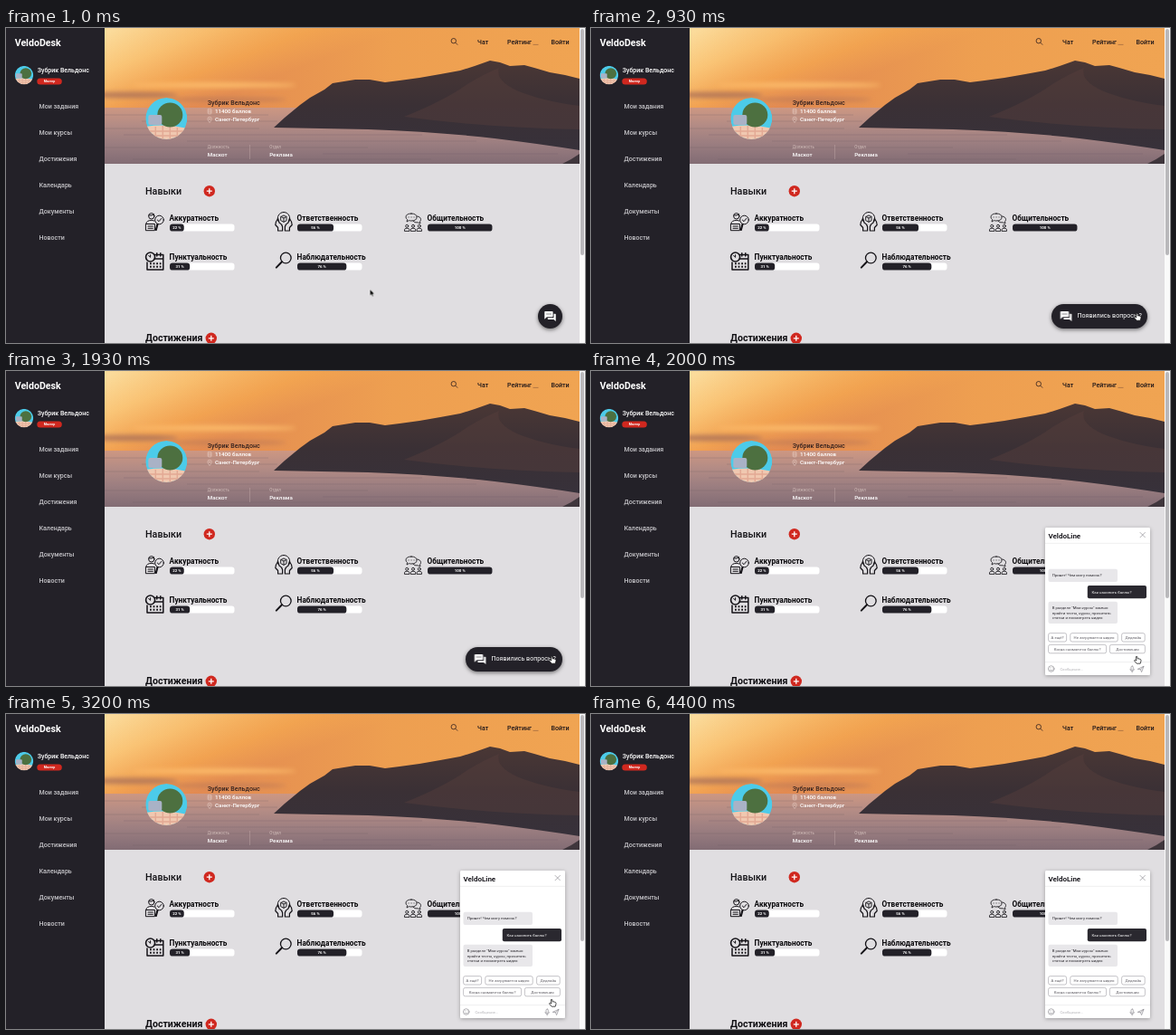
An HTML page that plays this animation: 640 px wide and 348 px high, repeating every 4.47 s.

```html
<!DOCTYPE html>
<html lang="ru">
<head>
<meta charset="utf-8">
<title>VeldoDesk</title>
<style>
  :root { --dark: #232128; --loop: 4.47s; }
  html, body { margin: 0; width: 100%; height: 100%; overflow: hidden; background: #e0dee1; }
  #stage { position: relative; width: 640px; height: 348px; overflow: hidden; font-family: Roboto, sans-serif; }
  svg { position: absolute; left: 0; top: 0; display: block; }
  text { font-family: Roboto, sans-serif; }
  .menu text { font-size: 7.05px; font-weight: 500; fill: #c6c5c9; }
  .nav text { font-size: 7.1px; font-weight: 500; fill: #21181a; }
  .info text { font-size: 6.2px; font-weight: 500; fill: #fff; }
  .info .cap { font-size: 4.5px; font-weight: 400; fill: #e6d3cd; opacity: .75; }
  .skill { font-size: 8.25px; font-weight: 700; fill: #08070a; }
  .pct { font-size: 4.4px; font-weight: 700; fill: #fff; text-anchor: middle; }
  .line { fill: none; stroke: #141217; stroke-width: 1; stroke-linecap: round; stroke-linejoin: round; }
  .msg { font-size: 4.35px; fill: #29272d; }
  .chips rect { fill: #fff; stroke: #8b8990; stroke-width: .5; }
  .chips text { font-size: 4.3px; fill: #5c5a61; text-anchor: middle; }
  .thin { fill: none; stroke: #807e85; stroke-width: .6; stroke-linecap: round; stroke-linejoin: round; }

  #help {
    position: absolute; right: 25.3px; top: 305px; width: 26.7px; height: 26.7px;
    border-radius: 13.4px; background: var(--dark); color: #fff; overflow: hidden;
    box-shadow: 0 1.5px 4px rgba(0,0,0,.5);
    animation: widen var(--loop) infinite;
  }
  #help svg { left: 6.8px; top: 6.8px; animation: shift var(--loop) infinite; }
  #help span {
    position: absolute; left: 28px; top: 0; font: 400 7.1px/26px Roboto, sans-serif;
    white-space: nowrap; animation: show var(--loop) infinite;
  }
  @keyframes widen {
    0%, 15.2% { width: 26.7px; animation-timing-function: ease; }
    22%, 100% { width: 106.7px; }
  }
  @keyframes shift {
    0%, 15.2% { transform: none; animation-timing-function: ease; }
    22%, 100% { transform: translateX(2.6px); }
  }
  @keyframes show {
    0%, 15.2% { opacity: 0; animation-timing-function: ease; }
    19%, 100% { opacity: 1; }
  }

  #chat { animation: open var(--loop) step-end infinite; }
  @keyframes open { 0% { visibility: hidden; } 44.6%, 100% { visibility: visible; } }

  #cursor { animation: move var(--loop) infinite; }
  #arrow { animation: arrow var(--loop) step-end infinite; }
  #hand { animation: hand var(--loop) step-end infinite; }
  @keyframes move {
    0%, 3.2% { transform: translate(402.3px, 288.6px); animation-timing-function: ease-in-out; }
    18.6%, 76% { transform: translate(603px, 315px); animation-timing-function: ease-in; }
    86%, 100% { transform: translate(646px, 317px); }
  }
  @keyframes arrow { 0% { opacity: 1; } 15.2% { opacity: 0; } 80% { opacity: 1; } 100% { opacity: 1; } }
  @keyframes hand { 0% { opacity: 0; } 15.2% { opacity: 1; } 80% { opacity: 0; } 100% { opacity: 0; } }
</style>
</head>
<body>
<div id="stage">
<svg width="640" height="348" viewBox="0 0 640 348">
  <defs>
    <linearGradient id="sky" gradientUnits="userSpaceOnUse" x1="150" y1="-10" x2="190" y2="95">
      <stop offset="0" stop-color="#fbdc9c"/><stop offset=".35" stop-color="#fac678"/>
      <stop offset=".7" stop-color="#f2a252"/><stop offset="1" stop-color="#dd8253"/>
    </linearGradient>
    <linearGradient id="warm">
      <stop offset="0" stop-color="#f0a04c" stop-opacity="0"/><stop offset=".6" stop-color="#f2a650" stop-opacity=".8"/>
      <stop offset="1" stop-color="#f0a452"/>
    </linearGradient>
    <linearGradient id="sea" x2="0" y2="1">
      <stop offset="0" stop-color="#cd9782"/><stop offset=".3" stop-color="#b48c85"/>
      <stop offset=".65" stop-color="#9a7d80"/><stop offset="1" stop-color="#826c74"/>
    </linearGradient>
    <linearGradient id="hill" x2="0" y2="1">
      <stop offset="0" stop-color="#4a3735"/><stop offset=".5" stop-color="#3a3035"/><stop offset="1" stop-color="#37313a"/>
    </linearGradient>
    <filter id="soft" x="-30%" y="-80%" width="160%" height="260%"><feGaussianBlur stdDeviation="2.5"/></filter>
    <filter id="shade" x="-10%" y="-10%" width="120%" height="120%"><feDropShadow dx="0" dy="1" stdDeviation="2" flood-opacity=".3"/></filter>
    <clipPath id="hero"><path d="M109 0H634V150H109z"/></clipPath>
    <clipPath id="disc"><circle r="23"/></clipPath>
    <g id="avatar" clip-path="url(#disc)">
      <circle r="23" fill="#4ccbe9"/>
      <path d="M-24 9Q0 5 24 11V24H-24z" fill="#f0c8b0"/>
      <path d="M-20 14H20M-17 19H17M-12 9V23M-4 8V23M4 9V23M12 10V23" stroke="#e3a994" stroke-width="1.5"/>
      <ellipse cx="4" cy="-4" rx="14" ry="13.5" fill="#4d7040"/>
      <rect x="-20" y="-4" width="15" height="11" rx="2" fill="#a9b2c6"/>
    </g>
    <g id="plus">
      <circle r="6.2" fill="#d0281f"/><path d="M-3 0H3M0 -3V3" stroke="#fff" stroke-width="1.3"/>
    </g>
    <g id="person"><circle cy="-2.2" r="1.5"/><path d="M-2.7 3V1.8Q-2.5 .2 0 .2T2.7 1.8V3z"/></g>
  </defs>

  <!-- banner -->
  <g clip-path="url(#hero)">
    <path d="M109 0H634V90H109z" fill="url(#sky)"/>
    <path d="M109 0H634V90H109z" fill="url(#warm)"/>
    <g filter="url(#soft)">
      <ellipse cx="140" cy="74" rx="50" ry="3.5" fill="#b87a58"/>
      <ellipse cx="245" cy="79" rx="65" ry="2.5" fill="#c77f55"/>
      <ellipse cx="230" cy="63" rx="90" ry="3" fill="#fbb969"/>
    </g>
    <path d="M109 88H634V150H109z" fill="url(#sea)"/>
    <path d="M109 96H290M150 103H300M109 111H280M130 118H460M200 125H520M109 132H400M350 139H610M140 145H470" stroke="#6d5a63" opacity=".25"/>
    <path d="M296 110L308 99L325 85L336 77L352 68L361 61L386 57L402 57L419 60L435 58L457 55L480 51L502 47L518 42L535 36L546 38L557 42L573 41L584 44L601 49L618 52L634 56V135Q590 128 540 122Q480 115 400 112z" fill="url(#hill)"/>
    <path d="M440 98Q485 80 510 62Q530 50 545 44Q540 60 572 72Q600 82 634 86V112Q530 110 440 98z" fill="#573f3c" opacity=".45"/>
    <path d="M634 139V150H615Q624 146 634 139z" fill="#3f363c"/>
  </g>
  <g class="nav">
    <g fill="none" stroke="#32201e" stroke-width=".8"><circle cx="494.8" cy="14.2" r="2.7"/><path d="M496.8 16.2L499.2 18.6"/></g>
    <text x="521" y="18.4">Чат</text><text x="554" y="18.4">Рейтинг</text><text x="602.5" y="18.4">Войти</text>
    <path d="M582.5 18.4H588.5" stroke="#8a5a3a" stroke-width=".6"/>
  </g>
  <use href="#avatar" x="177.3" y="100"/>
  <text x="222.8" y="84.5" font-size="7.1" font-weight="500" fill="#33211f">Зубрик Вельдонс</text>
  <g class="info">
    <g fill="none" stroke="#f0dcd4" stroke-width=".6" opacity=".8">
      <rect x="223.2" y="89.3" width="3.8" height="5.6" rx=".8"/><path d="M223.2 91.2H227M223.2 93H227"/>
      <path d="M225.1 104.5Q222.7 101.8 222.9 100.4A2.2 2.2 0 0 1 227.3 100.4Q227.5 101.8 225.1 104.5z"/><circle cx="225.1" cy="100.6" r=".7"/>
    </g>
    <text x="231" y="94.3">11400 баллов</text>
    <text x="231" y="103.4">Санкт-Петербург</text>
    <text class="cap" x="222.8" y="133.4">Должность</text><text x="222.8" y="142">Маскот</text>
    <path d="M269.3 129V145" stroke="#e0cbc5" stroke-width=".5" opacity=".7"/>
    <text class="cap" x="291.2" y="133.4">Отдел</text><text x="291.2" y="142">Реклама</text>
  </g>

  <!-- sidebar -->
  <path d="M0 0H109V348H0z" fill="#232128"/>
  <text x="9.7" y="20.2" font-size="10.6" font-weight="700" fill="#fff">VeldoDesk</text>
  <use href="#avatar" transform="translate(20 52) scale(.45)"/>
  <text x="34.8" y="49.4" font-size="7" font-weight="500" fill="#fff">Зубрик Вельдонс</text>
  <rect x="34.3" y="55.4" width="27.5" height="7.2" rx="3.6" fill="#d0281f"/>
  <text x="48" y="60.3" font-size="3.6" font-weight="700" fill="#fff" text-anchor="middle">Мастер</text>
  <g class="menu" id="menu"></g>

  <!-- skills -->
  <text x="154" y="183.8" font-size="10.7" font-weight="500" fill="#111014">Навыки</text>
  <use href="#plus" x="224.8" y="180.2"/>
  <text x="154" y="346.3" font-size="10.6" font-weight="700" fill="#111014">Достижения</text>
  <use href="#plus" x="226.8" y="342.8"/>
  <g id="skills"></g>

  <g class="line" transform="translate(154 204)">
    <circle cx="6.8" cy="3.8" r="3.2"/><path d="M3.9 3Q7.4 3.4 9.7 2M.8 12Q1.6 8.4 6.8 8.4Q8.8 8.4 9.8 9"/>
    <rect x=".8" y="12.5" width="9.6" height="7.2"/><path d="M3 15H8.3M3 17.3H8.3"/>
    <circle cx="15.5" cy="8" r="4.8"/><path d="M13.3 8L15 9.7L17.8 6.4"/>
    <path d="M13.4 13L11.8 19" stroke-width="2.2"/>
  </g>
  <g class="line" transform="translate(297 204)">
    <path d="M4 9.5A6.8 6.8 0 1 1 16 9.5"/>
    <path d="M7 4.5L10 3L13 4.5V8.8L10 10.3L7 8.8zM7 4.5L10 6L13 4.5M10 6V10.3" stroke-width=".9"/>
    <path d="M3.6 6.5Q.8 10 .8 13.5L3.6 16.5V20H8.6V15.5Q8 12.8 5 11zM16.4 6.5Q19.2 10 19.2 13.5L16.4 16.5V20H11.4V15.5Q12 12.8 15 11z" stroke-width="1.2"/>
  </g>
  <g class="line" style="stroke-width:.85" transform="translate(440 204)">
    <path d="M8 1Q14 1 14 5T8 9Q6.5 9 5.5 8.6L3 10L3.6 7.6Q2 6.5 2 5Q2 1 8 1z"/>
    <path d="M14.5 4Q18.5 4.6 18.5 7.6Q18.5 9 17.5 9.8L18 12L15.5 10.9Q11.5 11.4 10 9.3"/>
    <path d="M5 5H5.1M8 5H8.1M11 5H11.1"/>
    <use href="#person" x="3.2" y="17"/><use href="#person" x="10" y="17"/><use href="#person" x="16.8" y="17"/>
  </g>
  <g class="line" transform="translate(154 247)">
    <path d="M10.5 3.5H19.8V20H2V12M10.5 8H19.8M12.8 1.8V5M16.8 1.8V5" stroke-width="1.5"/>
    <circle cx="5.6" cy="6" r="5" stroke-width="1.6"/><path d="M5.6 6V3.6M5.6 6L3.6 4.6"/>
    <path d="M5 13.2H17.5M5 16.8H17.5" stroke-width="2.1" stroke-dasharray="1.8 1.8" stroke-linecap="butt"/>
  </g>
  <g class="line" transform="translate(297 247)">
    <circle cx="12.3" cy="7" r="5.8" stroke-width="1.3"/><path d="M8 11.3L1.8 17.6" stroke-width="2"/>
  </g>

  <!-- scrollbar -->
  <path d="M634 0H640V348H634z" fill="#fafafa"/>
  <rect x="635" y="1" width="4" height="250" rx="2" fill="#b9b8bb"/>
</svg>

<div id="help">
  <svg width="13" height="13" viewBox="0 0 14 14">
    <path d="M1 1H9.5Q10.3 1 10.3 1.8V7Q10.3 7.8 9.5 7.8H3L.3 10.4V1.8Q.3 1 1 1z" fill="#fff"/>
    <path d="M11.3 4H13Q13.7 4 13.7 4.8V13L11.2 10.7H4.7Q4 10.7 4 10V8.8H10.5Q11.3 8.8 11.3 8z" fill="#fff"/>
    <path d="M2.7 4.4H8" stroke="#232128" stroke-width="1.1" stroke-dasharray="1.1 1"/>
  </svg>
  <span>Появились вопросы?</span>
</div>

<svg width="640" height="348" viewBox="0 0 640 348">
  <g id="chat">
    <rect x="502" y="173" width="116" height="163" rx="1.5" fill="#fff" filter="url(#shade)"/>
    <text x="505.4" y="185" font-size="8" font-weight="700" fill="#1d1b21">VeldoLine</text>
    <path class="thin" d="M607 178.4L612.4 183.8M612.4 178.4L607 183.8"/>
    <path d="M502 190.3H618M502 321.6H618" stroke="#e3e2e5" stroke-width=".6"/>
    <rect x="505.5" y="218.8" width="76.5" height="14.2" rx="2" fill="#e8e7ea"/>
    <text class="msg" x="509.7" y="227.4">Привет! Чем могу помочь?</text>
    <rect x="548.8" y="237" width="65.2" height="14.2" rx="2" fill="#2a282f"/>
    <text class="msg" x="553.5" y="245.5" style="fill:#fff">Как накопить баллы?</text>
    <rect x="505.5" y="254.8" width="76.5" height="24.2" rx="2" fill="#e8e7ea"/>
    <text class="msg" y="262.8">
      <tspan x="509.7">В разделе "Мои курсы" можно</tspan>
      <tspan x="509.7" dy="5.8">пройти тесты, курсы, прочитать</tspan>
      <tspan x="509.7" dy="5.8">статьи и посмотреть видео</tspan>
    </text>
    <g class="chips" id="chips"></g>
    <g class="thin">
      <circle cx="508.7" cy="329" r="3.3"/><path d="M507 330.2Q508.7 332 510.4 330.2M507.5 327.8V328M509.9 327.8V328"/>
      <rect x="597" y="326" width="2.3" height="4.4" rx="1.15"/><path d="M595.9 329.3Q596 331.6 598.15 331.6T600.4 329.3M598.15 331.6V333"/>
      <path d="M604.6 329.2L611 326.2L608.6 332.6L607.5 329.9zM607.5 329.9L611 326.2"/>
    </g>
    <text x="518.4" y="330.7" font-size="4.2" fill="#b4b3b8">Сообщение...</text>
  </g>
  <g id="cursor" stroke-linejoin="round">
    <path id="arrow" d="M0 0V7.2L1.7 5.7L2.8 8.2L4.1 7.6L3 5.2H5.2z" fill="#000" stroke="#fff" stroke-width=".6"/>
    <path id="hand" d="M-.6 .6Q0 -.4 .7 .5L1.3 3L2.2 2.8L3.2 3.1L4.3 3.4Q5.3 3.9 4.9 5.6L4.2 8.2H.2L-2.4 5.2Q-2.6 4.1 -1.4 4.3L-.2 5z" fill="#fff" stroke="#000" stroke-width=".7"/>
  </g>
</svg>
</div>
<script>
  const fill = (id, rows, draw) => {
    document.getElementById(id).innerHTML = rows.map(draw).join('');
  };

  fill('menu', ['Мои задания', 'Мои курсы', 'Достижения', 'Календарь', 'Документы', 'Новости'],
    (name, i) => `<text x="36.5" y="${89.4 + 28.9 * i}">${name}</text>`);

  const bar = 71.5;
  fill('skills', [
    ['Аккуратность', 22, 181, 213],
    ['Ответственность', 56, 322, 213],
    ['Общительность', 100, 466, 213],
    ['Пунктуальность', 31, 181, 256],
    ['Наблюдательность', 76, 322, 256]
  ], ([name, pct, x, y]) => {
    const w = bar * pct / 100;
    return `<text class="skill" x="${x - .4}" y="${y}">${name}</text>
      <rect x="${x}" y="${y + 3.4}" width="${bar}" height="8.2" rx="3.2" fill="#fff"/>
      <rect x="${x}" y="${y + 3.4}" width="${w}" height="8.2" rx="3.2" fill="#232128"/>
      <text class="pct" x="${x + w / 2}" y="${y + 9}">${pct} %</text>`;
  });

  fill('chips', [
    ['А ещё?', 505.6, 289.6, 20],
    ['Не загружается видео', 529.8, 289.6, 52.4],
    ['Дедлайн', 586.6, 289.6, 25.6],
    ['Когда снимаются баллы?', 505.6, 302.4, 64],
    ['Достижения', 573.4, 302.4, 39]
  ], ([name, x, y, w]) =>
    `<rect x="${x}" y="${y}" width="${w}" height="9.4" rx="2"/>
     <text x="${x + w / 2}" y="${y + 6.2}">${name}</text>`);
</script>
</body>
</html>
```
